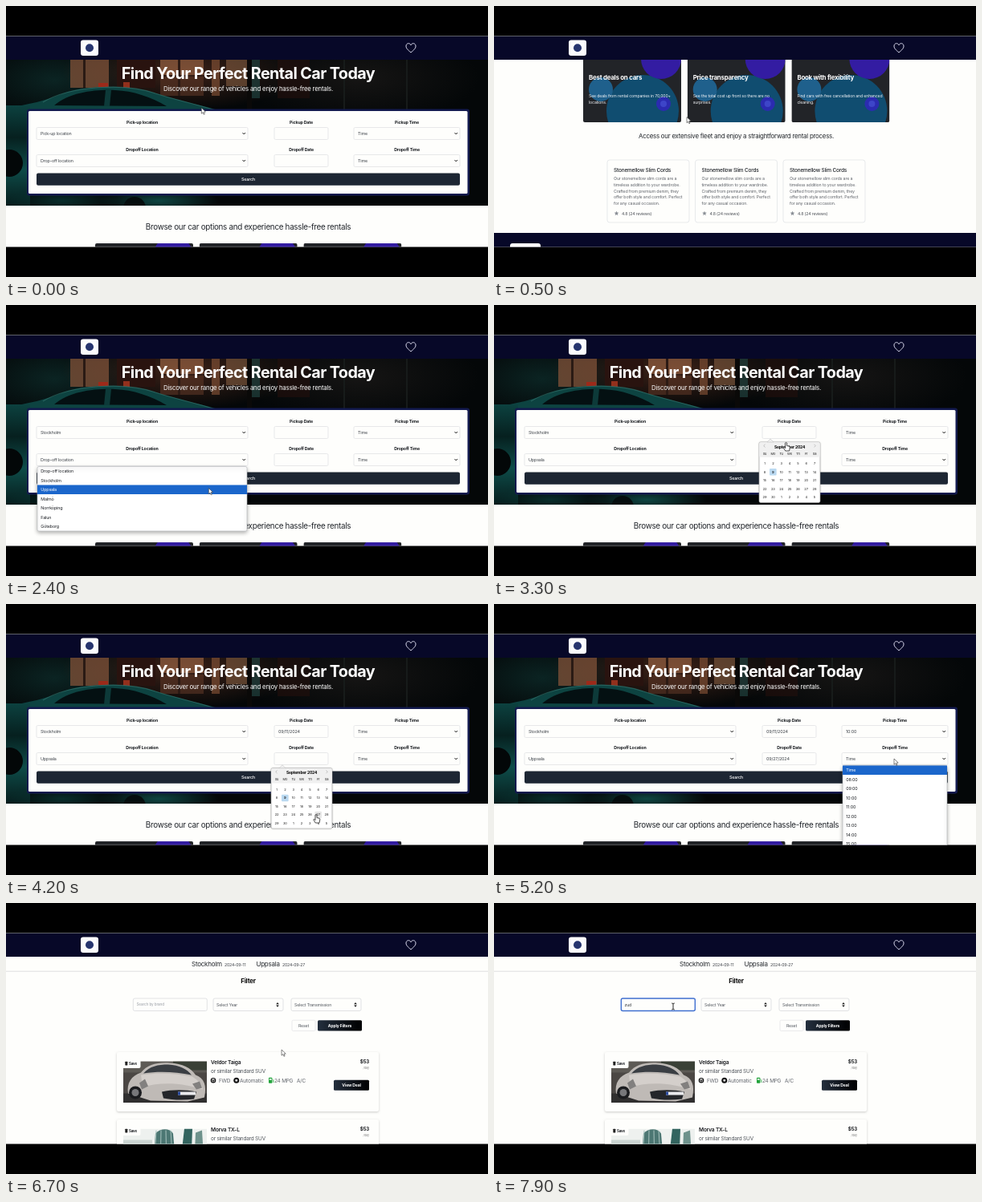
These frames come from a looping animation (600x338 px, 8000 ms). An HTML page with a canvas:

```html
<!DOCTYPE html>
<html lang="en">
<head>
<meta charset="utf-8">
<title>Car rental demo</title>
<style>
html, body { margin: 0; width: 100%; height: 100%; overflow: hidden; background: #000; }
canvas { display: block; width: 600px; height: 338px; }
</style>
</head>
<body>
<canvas id="stage"></canvas>
<script>
const LOOP = 8000, STEP = 100;
const canvas = document.getElementById('stage');
const c = canvas.getContext('2d');
const dpr = window.devicePixelRatio || 1;
canvas.width = 600 * dpr;
canvas.height = 338 * dpr;

const INK = '#1c1f24', GREY = '#62666d', NAVY = '#070828', PAPER = '#fefefc';
const ROW = 11.5;
const CITIES = ['Stockholm', 'Uppsala', 'Malmö', 'Norrköping', 'Falun', 'Göteborg'];
const HOURS = ['Time', ...Array.from({ length: 12 }, (_, i) => String(i + 8).padStart(2, '0') + ':00')];

// ---- helpers ----
const ease = u => u * u * (3 - 2 * u);

function track(keys, t) {
  let a = keys[0];
  for (const b of keys) {
    if (t < b[0]) {
      const u = ease((t - a[0]) / (b[0] - a[0]));
      return a.slice(1).map((v, i) => v + (b[i + 1] - v) * u);
    }
    a = b;
  }
  return a.slice(1);
}

function rect(x, y, w, h, fill, r = 0, stroke, lw = 0.7) {
  c.beginPath();
  c.roundRect(x, y, w, h, r);
  if (fill) { c.fillStyle = fill; c.fill(); }
  if (stroke) { c.strokeStyle = stroke; c.lineWidth = lw; c.stroke(); }
}

function disc(x, y, r, fill) {
  c.beginPath();
  c.arc(x, y, r, 0, 7);
  c.fillStyle = fill;
  c.fill();
}

function shape(d, fill, stroke, lw = 1) {
  const p = new Path2D(d);
  if (fill) { c.fillStyle = fill; c.fill(p); }
  if (stroke) { c.strokeStyle = stroke; c.lineWidth = lw; c.stroke(p); }
}

function glow(x, y, rx, ry, rgb, alpha) {
  c.save();
  c.translate(x, y);
  c.scale(rx, ry);
  const g = c.createRadialGradient(0, 0, 0, 0, 0, 1);
  g.addColorStop(0, `rgba(${rgb},${alpha})`);
  g.addColorStop(1, `rgba(${rgb},0)`);
  c.fillStyle = g;
  c.fillRect(-1, -1, 2, 2);
  c.restore();
}

function text(s, x, y, size, color = INK, weight = 400, align = 'left') {
  c.font = `${weight} ${size}px Inter, sans-serif`;
  c.letterSpacing = -0.03 * size + 'px';
  c.textAlign = align;
  c.textBaseline = 'middle';
  c.fillStyle = color;
  c.fillText(s, x, y + 0.05 * size);
}

function withShadow(draw, blur = 5, y = 2, alpha = 0.3) {
  c.save();
  c.shadowColor = `rgba(0,0,0,${alpha})`;
  c.shadowBlur = blur * dpr;
  c.shadowOffsetY = y * dpr;
  draw();
  c.restore();
}

function shifted(dx, dy, draw) {
  c.save();
  c.translate(dx, dy);
  draw();
  c.restore();
}

// ---- home page ----
function heroPhoto() {
  c.save();
  c.beginPath();
  c.rect(0, 60, 600, 189);
  c.clip();
  rect(0, 60, 600, 189, '#040708');
  glow(60, 92, 110, 50, '14,48,46', 0.7);
  glow(220, 82, 150, 48, '84,44,30', 0.7);
  glow(440, 90, 150, 55, '26,24,23', 0.8);

  // lit shop front
  rect(80, 60, 48, 42, 'rgba(128,82,56,0.75)');
  rect(96, 60, 3, 42, '#2a1a14');
  rect(115, 96, 12, 9, '#9c2a1a');
  rect(138, 60, 48, 42, '#29130f');
  rect(146, 95, 8, 8, '#92301c');
  rect(192, 60, 54, 26, 'rgba(150,98,66,0.7)');
  rect(192, 88, 54, 24, 'rgba(92,54,38,0.6)');
  rect(214, 60, 3, 52, '#2c1a14');
  rect(256, 60, 10, 52, 'rgba(140,88,58,0.6)');
  rect(274, 60, 26, 40, 'rgba(142,100,70,0.55)');
  rect(300, 60, 6, 70, '#0a0908');
  rect(306, 60, 10, 55, 'rgba(34,74,70,0.6)');
  rect(338, 60, 40, 55, 'rgba(36,16,13,0.6)');
  rect(420, 60, 2, 69, '#171b1a');
  rect(498, 60, 2, 69, '#171b1a');

  // parked car
  shape('M0 128 C30 122 50 118 66 111 C92 99 150 97 184 108 C208 116 236 122 264 130 L264 140 L0 140 Z', '#0d4341');
  shape('M60 124 C80 107 112 104 136 105 C158 106 180 113 200 125 Z', '#041012');
  shape('M124 105 L131 105 L129 125 L122 125 Z', '#0d3a39');
  shape('M46 120 C80 99 150 96 186 109 C210 117 236 122 260 130', null, 'rgba(64,132,124,0.5)', 1.1);
  const side = c.createLinearGradient(0, 118, 0, 249);
  side.addColorStop(0, '#0d4644');
  side.addColorStop(0.35, '#06201f');
  side.addColorStop(0.65, '#0e4c49');
  side.addColorStop(1, '#061c1c');
  rect(0, 124, 30, 125, side);
  disc(4, 196, 17, '#030708');
  glow(70, 243, 70, 16, '10,58,55', 0.75);
  glow(190, 243, 75, 16, '18,90,85', 0.75);
  disc(160, 252, 14, '#050d0e');
  c.restore();
}

function chevron(x, y) {
  shape(`M${x - 1.7} ${y - 1} l1.7 1.9 l1.7 -1.9`, null, '#222', 1);
}

function field(label, value, x, y, w, isSelect) {
  text(label, x + w / 2, y - 14, 5.25, '#15181d', 700, 'center');
  rect(x, y - 7.5, w, 15, PAPER, 1.5, '#dfe0e2');
  if (value) text(value, x + 5, y + 0.1, 5.4, '#3e434a');
  if (isSelect) chevron(x + w - 4.8, y);
}

function searchPanel(t) {
  rect(26, 128.5, 551, 108, '#131a4e', 3);
  rect(28, 131, 546.5, 103, PAPER, 1.5);
  field('Pick-up location', t < 1900 ? 'Pick-up location' : CITIES[0], 38, 159, 263, true);
  field('Dropoff Location', t < 2900 ? 'Drop-off location' : CITIES[1], 38, 193, 263, true);
  field('Pickup Date', t < 3700 ? '' : '09/11/2024', 334, 159, 67);
  field('Dropoff Date', t < 4500 ? '' : '09/27/2024', 334, 193, 67);
  field('Pickup Time', t < 5100 ? 'Time' : HOURS[3], 433, 159, 132, true);
  field('Dropoff Time', t < 5500 ? 'Time' : HOURS[3], 433, 193, 132, true);
  rect(38, 208.5, 527, 15.2, '#1d2633', 2);
  text('Search', 301.5, 216, 5.4, '#fff', 500, 'center');
}

const PROMOS = [
  ['Best deals on cars', 'See deals from rental companies in 70,000+', 'locations.'],
  ['Price transparency', 'See the total cost up front so there are no', 'surprises.'],
  ['Book with flexibility', 'Find cars with free cancellation and enhanced', 'cleaning.']
];

function promoCard([title, a, b]) {
  c.save();
  c.beginPath();
  c.roundRect(0, 296, 122, 95, 2);
  c.clip();
  rect(0, 296, 122, 95, '#222428');
  disc(74, 377, 45, '#104d70');
  disc(22, 350, 15, '#1f608c');
  disc(97, 312, 25, '#331ca2');
  disc(100, 368, 9, '#2b2bb0');
  disc(100, 368, 4, '#3d45c8');
  c.restore();
  text(title, 7, 335.7, 7.9, '#fff', 700);
  text(a, 7, 358.3, 5.2, '#f2f4f7');
  text(b, 7, 365.8, 5.2, '#f2f4f7');
}

const REVIEW = [
  'Our stonemellow slim cords are a',
  'timeless addition to your wardrobe.',
  'Crafted from premium denim, they',
  'offer both style and comfort. Perfect',
  'for any casual occasion.'
];

function star(x, y, r) {
  c.beginPath();
  for (let i = 0; i < 10; i++) {
    const a = i * Math.PI / 5 - Math.PI / 2, k = i % 2 ? r * 0.45 : r;
    c.lineTo(x + k * Math.cos(a), y + k * Math.sin(a));
  }
  c.closePath();
  c.fillStyle = '#8b9097';
  c.fill();
}

function reviewCard() {
  rect(0, 438, 102, 78, PAPER, 3, '#dfe1e4');
  text('Stonemellow Slim Cords', 8, 450.5, 6.5, '#20242a', 500);
  REVIEW.forEach((line, i) => text(line, 8, 461.5 + i * 7.6, 5.3, GREY));
  star(11.5, 504.7, 3);
  text('4.8 (24 reviews)', 18, 504.8, 5.2, '#4c5057');
}

function home(t) {
  const [scroll] = track([[0, 0], [80, 0], [480, 246], [850, 246], [1180, 0]], t);
  shifted(0, -scroll, () => {
    heroPhoto();
    text('Find Your Perfect Rental Car Today', 301.5, 83.6, 19.8, '#fff', 700, 'center');
    text('Discover our range of vehicles and enjoy hassle-free rentals.', 301.5, 103, 7.85, '#fff', 400, 'center');
    searchPanel(t);
    text('Browse our car options and experience hassle-free rentals', 301.5, 275.6, 9.83, '#22262c', 400, 'center');
    PROMOS.forEach((p, i) => shifted(111 + i * 129.7, 0, () => promoCard(p)));
    text('Access our extensive fleet and enjoy a straightforward rental process.', 301.5, 408.7, 7.87, '#22262c', 400, 'center');
    for (let i = 0; i < 3; i++) shifted(141 + i * 109.5, 0, reviewCard);
    rect(0, 529, 600, 60, NAVY);
    rect(20, 542, 38, 30, PAPER, 3);
  });
}

// ---- pop-ups ----
function dropdown(items, x, y, w, cursorY) {
  const hot = Math.max(0, Math.min(items.length - 1, Math.floor((cursorY - y) / ROW)));
  withShadow(() => rect(x, y, w, items.length * ROW, '#fff', 2, '#b4b6ba', 0.6));
  rect(x, y + hot * ROW, w, ROW, '#1b66cb');
  items.forEach((s, i) => text(s, x + 4.3, y + (i + 0.5) * ROW, 5.4, i === hot ? '#fff' : INK));
}

function calendar(top, [cx, cy]) {
  const px = 10.33, py = 10.5, x0 = 337, y0 = top + 26.8;
  withShadow(() => rect(330, top, 76, 75.5, '#fff', 2, '#aeaeae', 0.6), 2, 0, 0.2);
  rect(330.3, top + 0.3, 75.4, 18.5, '#f0f0f0', 2);
  shape(`M340 ${top} l4 -4 l4 4 Z`, '#f0f0f0', '#aeaeae', 0.4);
  shape(`M337.5 ${top + 2.8} l-1.8 1.8 l1.8 1.8 M398.5 ${top + 2.8} l1.8 1.8 l-1.8 1.8`, null, '#b9b9b9', 0.9);
  text('September 2024', 368, top + 5.8, 4.9, '#000', 700, 'center');
  ['Su', 'Mo', 'Tu', 'We', 'Th', 'Fr', 'Sa'].forEach((d, i) => text(d, x0 + i * px, top + 14.3, 4, '#222', 400, 'center'));
  for (let i = 0; i < 35; i++) {
    const x = x0 + (i % 7) * px, y = y0 + Math.floor(i / 7) * py;
    const over = Math.abs(cx - x) < 4.6 && Math.abs(cy - y) < 4.6;
    if (i === 8) rect(x - 4.3, y - 4.3, 8.6, 8.6, '#bad9f1', 1);
    else if (over) rect(x - 4.3, y - 4.3, 8.6, 8.6, '#e6e6e6', 1);
    text(String(i < 30 ? i + 1 : i - 29), x, y, 4.1, '#222', i === 8 ? 700 : 400, 'center');
  }
}

function popups(t, pos) {
  const open = (a, b) => t >= a && t < b;
  if (open(1500, 1900)) dropdown(['Pick-up location', ...CITIES], 39, 168, 261, pos[1]);
  if (open(2100, 2900)) dropdown(['Drop-off location', ...CITIES], 39, 201.5, 261, pos[1]);
  if (open(3200, 3700)) calendar(171, pos);
  if (open(3900, 4500)) calendar(204.7, pos);
  if (open(4700, 5100)) dropdown(HOURS, 434, 168, 130, pos[1]);
  if (open(5200, 5500)) dropdown(HOURS, 434, 201.5, 130, pos[1]);
}

// ---- results page ----
function darkButton(label, x, y, w, h) {
  const g = c.createLinearGradient(x, 0, x + w, 0);
  g.addColorStop(0, '#242f3e');
  g.addColorStop(0.9, '#020305');
  rect(x, y, w, h, g, 1.5);
  text(label, x + w / 2, y + h / 2, 5.1, '#fff', 700, 'center');
}

function sortSelect(label, x, w) {
  rect(x, 119, w, 15.5, PAPER, 2, '#d4d6da');
  text(label, x + 4, 126.8, 5.2, '#50555c');
  const ax = x + w - 7;
  shape(`M${ax - 1.8} 126.2 l1.8 -2.2 l1.8 2.2 Z M${ax - 1.8} 127.6 l1.8 2.2 l1.8 -2.2 Z`, '#111');
}

function sportsCar() {
  rect(0, 0, 104, 51.5, '#4b4744');
  rect(0, 0, 104, 14, '#5d5a55');
  rect(0, 40, 104, 12, '#302f2f');
  rect(62, 0, 42, 11, '#3a4036');
  shape('M6 40 C4 27 10 18 22 14 C30 4 42 1 58 2 C74 3 84 8 90 17 C101 21 104 30 101 45 L80 50 L34 49 Z', '#bfbab6');
  shape('M25 15 C33 6 43 4 56 4 C70 5 79 9 85 17 C66 13 44 12 25 15 Z', '#3a3e43');
  shape('M22 17 C44 14 66 15 86 19 C95 25 98 30 99 35 C75 27 48 25 24 32 Z', '#d4cfcb');
  shape('M20 27 l7 -5 l4 9 l-8 4 Z M86 28 l9 -3 l3 8 l-7 2 Z', '#82807f');
  shape('M48 38 C60 35 78 35 91 38 L88 47 C74 49 60 48 50 46 Z', '#24262a');
  disc(15, 39, 8, '#1b1c1f');
  disc(15, 39, 4.5, '#77777a');
  rect(68, 38, 22, 4, '#e9e9ec');
  rect(68, 38, 3, 4, '#2c4da0');
}

function skyline() {
  rect(0, 0, 104, 51.5, '#eef1ef');
  shape('M37 52 L40 6 C46 -1 58 -1 62 6 L66 52 Z', '#4c7773');
  for (let i = 0; i < 4; i++) shape(`M${41 + i * 6} 2 L${38 + i * 8} 52`, null, '#a8c3bf', 1);
  shape('M70 52 L76 0 L86 0 L84 52 Z', '#33645f');
  shape('M88 52 L90 5 L98 2 L101 52 Z', '#6e928c');
  rect(0, 14, 36, 40, '#cbd5d2');
}

function carCard(name, photo) {
  withShadow(() => rect(138, 186, 326, 74, PAPER, 2), 3, 1, 0.2);
  c.save();
  c.beginPath();
  c.rect(146, 197.5, 104, 51.5);
  c.clip();
  c.translate(146, 197.5);
  photo();
  c.restore();
  rect(144.5, 194, 23, 12, PAPER, 2);
  rect(148.3, 197.8, 3, 4.6, '#222', 0.4);
  text('Save', 153, 200.1, 4.4, INK, 700);
  text(name, 255, 198.2, 6.6, '#17191d', 600);
  text('or similar Standard SUV', 255, 209.9, 6.45, '#4c5158');
  c.beginPath();
  c.arc(258, 221.2, 2.7, 0, 7);
  c.lineWidth = 1.2;
  c.strokeStyle = '#111';
  c.stroke();
  shape('M255.5 221 h5 M258 221 v3', null, '#111', 1.1);
  text('FWD', 265, 221.3, 6.4, GREY);
  disc(286.8, 221.2, 3.5, '#111');
  rect(285.5, 219.9, 2.6, 2.6, '#fff', 0.6);
  text('Automatic', 291, 221.3, 6.6, GREY);
  rect(327, 217.8, 4.4, 7, '#23a43c', 0.8);
  rect(327.9, 219, 2.6, 1.8, '#fff');
  shape('M331.6 220 l1.3 1 v3', null, '#23a43c', 0.8);
  text('24 MPG', 334, 221.3, 6.4, GREY);
  text('A/C', 362, 221.3, 6.4, GREY);
  text('$53', 452, 198.2, 6.1, '#17191d', 700, 'right');
  text('/day', 452, 205.3, 3.8, '#888', 400, 'right');
  darkButton('View Deal', 408, 220.8, 44, 13);
}

function results(t) {
  const [scroll] = track([[0, 3], [6400, 3], [6700, 0]], t);
  const focus = t >= 7300;
  const typed = 'zud'.slice(0, Math.max(0, Math.floor((t - 7300) / 150)));
  shifted(0, -scroll, () => {
    text('Stockholm', 231, 76.3, 8, '#24282e');
    text('2024-09-11', 272, 77.1, 5.1, '#3a3e45');
    text('Uppsala', 311.5, 76.3, 8, '#24282e');
    text('2024-09-27', 344, 77.1, 5.1, '#3a3e45');
    rect(0, 84.7, 600, 0.7, '#d3d4d6');
    text('Filter', 301.5, 97.3, 8, '#111', 700, 'center');
    rect(158.3, 119, 92, 15.5, PAPER, 2, focus ? '#3f6fd0' : '#d4d6da', focus ? 1.4 : 0.7);
    if (typed) text(typed, 162.5, 126.8, 5.1, '#30343a');
    else text('Search by brand', 162.5, 126.8, 4.7, '#9a9ea5');
    sortSelect('Select Year', 258, 87);
    sortSelect('Select Transmission', 355, 87);
    rect(356, 146.2, 29, 13.3, PAPER, 1.5, '#e2e3e6');
    text('Reset', 370.5, 152.8, 5.3, '#555a61', 400, 'center');
    darkButton('Apply Filters', 388, 146.2, 55, 13.3);
    carCard('Veldor Taiga', sportsCar);
    shifted(0, 84, () => carCard('Morva TX-L', skyline));
  });
}

// ---- frame and pointer ----
function header() {
  rect(0, 37.5, 600, 29.5, NAVY);
  rect(93, 42.5, 22, 19.5, '#fbfbfd', 3);
  disc(104, 52.2, 5, '#26346e');
  shape('M504 58 C500 54.6 498 52.8 498 50 C498 46.3 502.6 45.4 504 48.8 C505.4 45.4 510 46.3 510 50 C510 52.8 508 54.6 504 58 Z', null, '#eef', 0.9);
}

const PATH = [
  [0, 243.3, 127], [500, 240, 138.5], [1200, 239.3, 138.5], [1450, 262, 159],
  [1800, 252, 184], [2050, 252, 193], [2400, 252.3, 228.5], [2850, 252, 230],
  [3150, 362, 159], [3600, 368, 209], [3850, 364, 193], [4200, 386, 263],
  [4450, 388, 263], [4700, 500, 159], [5050, 482, 208], [5200, 498, 193],
  [5450, 482, 241], [5650, 420, 216], [6100, 421, 217.3], [6400, 421, 218],
  [7100, 223, 129]
];

function pointer(t, [x, y]) {
  const hand = (t >= 3300 && t < 3700) || (t >= 4000 && t < 4500);
  const beam = t >= 7000;
  shifted(x, y, () => {
    if (beam) shape('M-1.8 -4 Q0 -4 0 -3 Q0 -4 1.8 -4 M0 -3 V3 M-1.8 4 Q0 4 0 3 Q0 4 1.8 4', null, '#111', 0.9);
    else if (hand) shape('M-1 0 Q0 -1 1 0 V3.6 L4.2 4.3 Q5 4.8 4.8 6 L4 10 H-0.8 L-3 6.5 Q-3.4 5.2 -2.2 5.4 L-1 6.6 Z', '#fff', '#222', 0.8);
    else shape('M0 0 V7.2 L1.7 5.7 L2.9 8.3 L4 7.8 L2.9 5.2 L5.2 5 Z', '#fff', '#333', 0.6);
  });
}

function draw(t) {
  const pos = track(PATH, t);
  c.setTransform(dpr, 0, 0, dpr, 0, 0);
  rect(0, 0, 600, 338, '#000');
  c.save();
  c.beginPath();
  c.rect(0, 37.5, 600, 263);
  c.clip();
  rect(0, 37, 600, 264, PAPER);
  if (t < 5700) {
    home(t);
    popups(t, pos);
  } else {
    results(t);
  }
  header();
  pointer(t, pos);
  c.restore();
}

const start = performance.now();
function tick(now) {
  const t = Math.max(0, now - start) % LOOP;
  draw(Math.floor(t / STEP) * STEP);
  requestAnimationFrame(tick);
}
draw(0);
requestAnimationFrame(tick);
</script>
</body>
</html>
```
